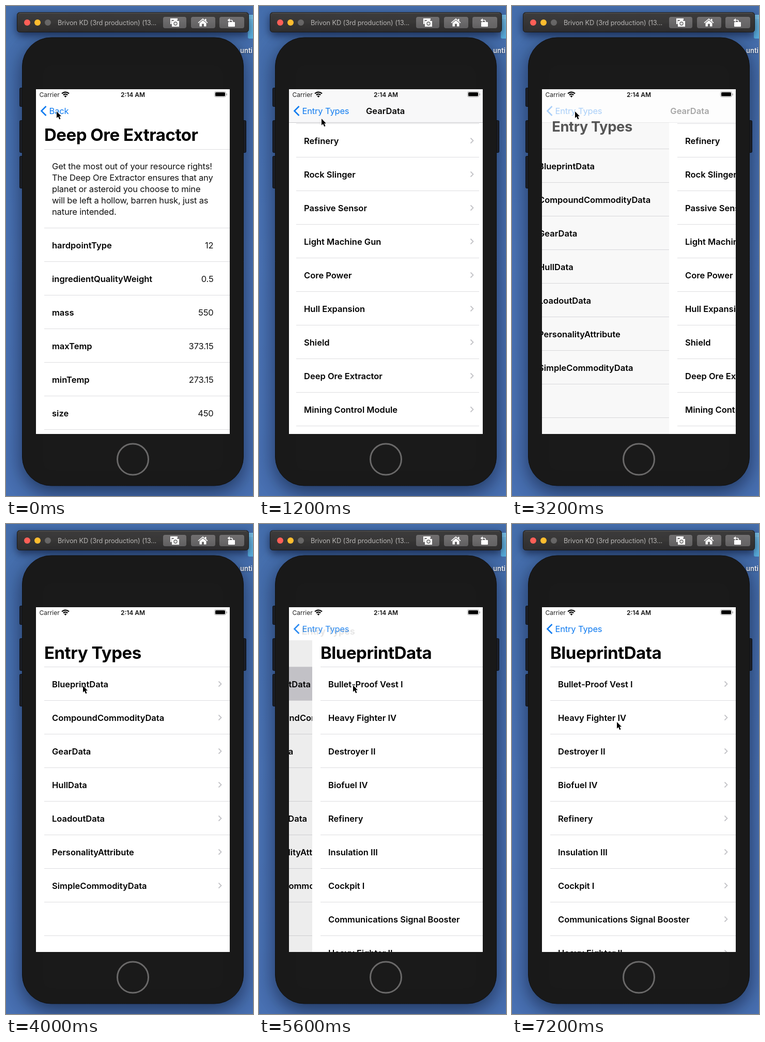
An HTML page with a canvas that plays this animation: 478x948 px, repeating every 8 s.

```html
<!DOCTYPE html>
<html lang="en">
<head>
<meta charset="utf-8">
<title>Entry browser</title>
<style>
  html, body { margin: 0; width: 100%; height: 100%; overflow: hidden; background: #4870b2; }
  canvas { display: block; }
</style>
</head>
<body>
<canvas id="stage" width="478" height="948"></canvas>
<script>
const ctx = document.getElementById('stage').getContext('2d');
const LOOP = 8000, STEP = 200;
const SCREEN = { x: 58, y: 161, w: 375, h: 667 };
const ROW = 65, BLUE = '#0f7bf0', LINE = '#dddde0', PRESSED = '#d1d0d5';

const types = {
  title: 'Entry Types', top: 276, lines: 9,
  rows: ['BlueprintData', 'CompoundCommodityData', 'GearData', 'HullData', 'LoadoutData',
    'PersonalityAttribute', 'SimpleCommodityData']
};
const gear = {
  title: 'GearData', inline: true, back: 'Entry Types', top: 227, lines: 10,
  rows: ['Refinery', 'Rock Slinger', 'Passive Sensor', 'Light Machine Gun', 'Core Power',
    'Hull Expansion', 'Shield', 'Deep Ore Extractor', 'Mining Control Module']
};
const blueprints = {
  title: 'BlueprintData', back: 'Entry Types', top: 276, lines: 9,
  rows: ['Bullet-Proof Vest I', 'Heavy Fighter IV', 'Destroyer II', 'Biofuel IV', 'Refinery',
    'Insulation III', 'Cockpit I', 'Communications Signal Booster', 'Heavy Fighter II']
};
const detail = {
  title: 'Deep Ore Extractor', back: 'Back', top: 429, lines: 7,
  intro: ['Get the most out of your resource rights!', 'The Deep Ore Extractor ensures that any',
    'planet or asteroid you choose to mine', 'will be left a hollow, barren husk, just as', 'nature intended.'],
  rows: ['hardpointType', 'ingredientQualityWeight', 'mass', 'maxTemp', 'minTemp', 'size'],
  values: ['12', '0.5', '550', '373.15', '273.15', '450']
};

// Pointer keys: time, x, y
const pointerKeys = [
  [0, 98, 204], [800, 98, 204], [1000, 105, 209], [1200, 121, 218], [1400, 128, 212], [1800, 130, 204],
  [2000, 130, 204], [2400, 122, 204], [3200, 122, 204], [3400, 126, 226], [4000, 149, 313],
  [4600, 149, 313], [5200, 170, 310], [5400, 170, 310], [5600, 182, 312], [6000, 238, 323],
  [6600, 203, 396], [6800, 203, 396], [7200, 203, 383], [LOOP, 203, 383]
];

const mix = (a, b, k) => a + (b - a) * k;

// Critically damped spring from 0 to 1
function spring(ms) {
  const x = Math.max(0, ms) * 0.01826;
  return 1 - (1 + x) * Math.exp(-x);
}

function text(str, x, y, font, { color = '#000', align = 'left', spacing = 0 } = {}) {
  ctx.font = font + ' Inter, sans-serif';
  ctx.letterSpacing = spacing + 'px';
  ctx.textAlign = align;
  ctx.fillStyle = color;
  ctx.fillText(str, x, y);
}
const body = (str, x, y, opts) => text(str, x, y, '400 16.5px', { spacing: -0.17, ...opts });
const strong = (str, x, y, opts) => text(str, x, y, '600 16.5px', opts);
const heading = (str, x, y, size = 33) => text(str, x, y, `700 ${size}px`, { spacing: size * -0.0145 });

function rect(x, y, w, h, fill) {
  ctx.fillStyle = fill;
  ctx.fillRect(x, y, w, h);
}
function box(x, y, w, h, r, fill, stroke) {
  ctx.beginPath();
  ctx.roundRect(x, y, w, h, r);
  if (fill) { ctx.fillStyle = fill; ctx.fill(); }
  if (stroke) { ctx.strokeStyle = stroke; ctx.stroke(); }
}
function disc(x, y, r, fill) {
  ctx.beginPath();
  ctx.arc(x, y, r, 0, 7);
  ctx.fillStyle = fill;
  ctx.fill();
}
function line(d, color, width) {
  ctx.strokeStyle = color;
  ctx.lineWidth = width;
  ctx.stroke(new Path2D(d));
}
function shape(d, color) {
  ctx.fillStyle = color;
  ctx.fill(new Path2D(d));
}
function shade(...stops) {
  const g = ctx.createLinearGradient(0, stops[0], 0, stops[1]);
  stops.slice(2).forEach((c, i, all) => g.addColorStop(i / (all.length - 1), c));
  return g;
}
function faded(alpha, draw) {
  ctx.save();
  ctx.globalAlpha = Math.max(0, Math.min(1, alpha));
  draw();
  ctx.restore();
}
function shadowed(blur, dy, draw) {
  ctx.save();
  ctx.shadowColor = 'rgba(8,18,45,.65)';
  ctx.shadowBlur = blur;
  ctx.shadowOffsetY = dy;
  draw();
  ctx.restore();
}

function drawDesktop() {
  rect(0, 0, 478, 948, shade(0, 948, '#446dab', '#4a73b5', '#4870b2'));
  box(468, 17, 20, 46, 3, shade(17, 63, '#79c2e8', '#56aee0'));
  rect(468, 23, 10, 1, '#8fd0ef');
  shadowed(3, 1, () => text('unti', 453, 91, '600 13px', { color: '#fff' }));
}

function drawToolbar() {
  ctx.lineWidth = 1;
  shadowed(16, 6, () => box(21.5, 12.5, 448, 38, 5, shade(13, 50, '#403f3e', '#302f2f'), '#191919'));
  rect(26, 13, 439, 1, '#5b5a5a');
  ['#fe5f57', '#febc2e', '#676666'].forEach((c, i) => disc(41 + 20 * i, 32, 6, c));
  text('Brivon KD (3rd production) (13...', 100, 37, '400 12.8px', { color: '#b6b4b3', spacing: -0.1 });
  for (const [x, w] of [[304, 45], [358, 47], [413, 48]])
    box(x, 21, w, 22, 4, shade(21, 43, '#716f70', '#636263'));

  shape('M318 24H332V27H320.500V35H318Z', '#fff');
  shape('M321 29H324L325.500 27H330.500L332 29H335V40H321Z', '#fff');
  ctx.beginPath();
  ctx.arc(328, 34, 3, 0, 7);
  ctx.lineWidth = 1.3;
  ctx.strokeStyle = '#666';
  ctx.stroke();

  shape('M371.500 32L381 24 385 27.400V25H387.500V29.500L390.500 32 389.500 33.300 381 26.300 372.500 33.300Z', '#fff');
  shape('M374.500 33L381 27.800 387.500 33V39.500H383V34.500H379V39.500H374.500Z', '#fff');

  box(430, 31, 13, 9, 1, '#fff');
  line('M432 27.500H436Q438.500 27.500 438.500 31', '#fff', 1.6);
  shape('M433 24L428.500 27.500 433 31Z', '#fff');
}

function drawPhone() {
  ctx.lineWidth = 1;
  for (const [x, y, h] of [[26.5, 158.5, 36], [26.5, 221.5, 62], [26.5, 290.5, 62], [457, 221.5, 62]])
    box(x, y, 7.5, h, 2, '#232323', '#0d0d0d');
  shadowed(38, 12, () => box(31.5, 61, 428, 867, 56, '#1a1a1a', '#101010'));
  ctx.lineWidth = 3;
  ctx.beginPath();
  ctx.arc(245.5, 877, 30, 0, 7);
  ctx.strokeStyle = '#6a6969';
  ctx.stroke();
}

function drawStatus() {
  text('Carrier', 64.5, 175.5, '400 12px', { color: '#222' });
  text('2:14 AM', 245.5, 175.5, '600 12px', { color: '#111', align: 'center' });
  ctx.strokeStyle = '#000';
  ctx.lineWidth = 2.3;
  for (const r of [5.6, 9.4]) {
    ctx.beginPath();
    ctx.arc(115, 176, r, -Math.PI * 0.76, -Math.PI * 0.24);
    ctx.stroke();
  }
  shape('M115 177L112.500 174.200Q115 172.200 117.500 174.200Z', '#000');
  ctx.lineWidth = 1;
  box(403.5, 165.5, 22, 10.5, 3, null, '#aaa');
  box(405, 167, 19, 7.5, 1.6, '#000');
  box(426.5, 169, 1.5, 4, 1, '#aaa');
}

function drawPage(page, dx, press) {
  ctx.save();
  ctx.translate(Math.round(dx), 0);
  rect(SCREEN.x, SCREEN.y, SCREEN.w, SCREEN.h, '#fff');
  if (page.intro) {
    rect(74, 277, 359, 1, LINE);
    page.intro.forEach((s, i) => body(s, 89, 315.5 + 22 * i, { color: '#111' }));
  }
  for (let i = 0; i < page.lines; i++) rect(74, page.top + ROW * i, 359, 1, LINE);
  if (press === 'start') rect(139, 305, 24, 28, PRESSED);
  if (press === 'full') rect(SCREEN.x, 277, SCREEN.w, 64, PRESSED);
  page.rows.forEach((s, i) => {
    const mid = page.top + ROW * i + 33.5;
    strong(s, 89, mid + 6);
    if (page.values) body(page.values[i], 401.5, mid + 6, { align: 'right', color: '#111' });
    else line(`M411.500 ${mid - 5}l5 5-5 5`, '#c3c3c7', 1.8);
  });
  if (press === 'start') rect(SCREEN.x, 277, 359, 28, PRESSED);
  ctx.restore();
}

// q: 0 = upper page covers the lower one, 1 = upper page has slid away
function drawScene(under, over, q, titleQ = q, press) {
  drawPage(under, -112 * (1 - q), press);
  faded(0.08 * (1 - q), () => rect(SCREEN.x, SCREEN.y, SCREEN.w * q, SCREEN.h, '#000'));
  drawPage(over, SCREEN.w * q);

  rect(SCREEN.x, SCREEN.y, SCREEN.w, 64, '#fff');
  for (const [page, show, shift] of [[under, q, -112 * (1 - q)], [over, 1 - q, SCREEN.w * q]]) {
    faded(show, () => {
      if (page.inline) {
        rect(SCREEN.x, SCREEN.y, SCREEN.w, 64, '#f8f8f9');
        rect(SCREEN.x, 225, SCREEN.w, 1, '#c6c6c9');
        strong(page.title, 245.5 + shift * 0.4, 209, { align: 'center' });
      }
      if (page.back) body(page.back, 83.5, 209, { color: BLUE });
    });
  }
  if (!over.inline) heading(over.title, 74 + Math.round(SCREEN.w * q), 261);
  if (!under.inline) {
    const k = 1 - titleQ;
    faded(titleQ, () => heading(under.title, mix(74, 83.5, k), mix(261, 209, k), mix(33, 16.5, k)));
  }
  faded(under.back ? 1 : 1 - q, () => line('M77.500 194L68.500 203 77.500 212', BLUE, 2.6));
}

function drawPointer(t) {
  const i = pointerKeys.findIndex(k => k[0] > t);
  const [t0, x0, y0] = pointerKeys[i - 1], [t1, x1, y1] = pointerKeys[i];
  const k = (t - t0) / (t1 - t0);
  ctx.save();
  ctx.translate(mix(x0, x1, k), mix(y0, y1, k));
  const arrow = 'M0 0V12.800L3 10 5.200 15.200 7.500 14.200 5.300 9.300H9Z';
  line(arrow, '#fff', 1.6);
  shape(arrow, '#000');
  ctx.restore();
}

function draw(t) {
  drawDesktop();
  drawToolbar();
  drawPhone();
  ctx.save();
  ctx.beginPath();
  ctx.rect(SCREEN.x, SCREEN.y, SCREEN.w, SCREEN.h);
  ctx.clip();
  if (t < 3077) drawScene(gear, detail, spring(t - 877));
  else if (t < 5385) drawScene(types, gear, spring(t - 3077));
  else drawScene(types, blueprints, 1 - spring(t - 5400), 1 - spring(t - 5385), t < 5600 ? 'start' : 'full');
  drawStatus();
  drawPointer(t);
  ctx.restore();
}

function tick(now) {
  draw(Math.floor(now % LOOP / STEP) * STEP);
  requestAnimationFrame(tick);
}
requestAnimationFrame(tick);
</script>
</body>
</html>
```
